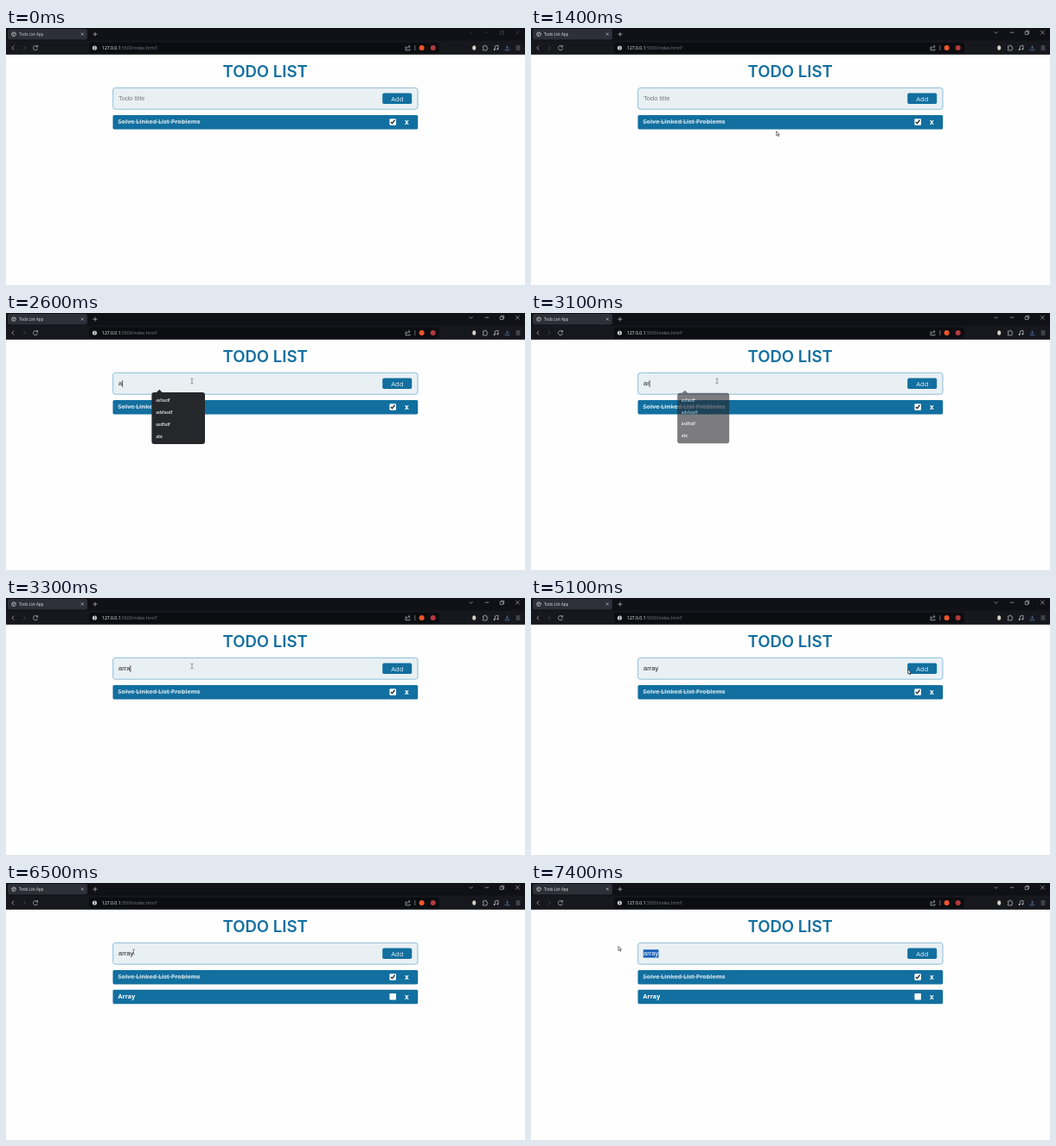
An HTML page for the animation above (8000 ms loop, 600 px wide and 298 px high).

```html
<!DOCTYPE html>
<html lang="en">
<head>
<meta charset="utf-8">
<title>Todo List App</title>
<style>
  html, body { margin: 0; width: 100%; height: 100%; overflow: hidden; background: #fefefe; }
  svg { display: block; width: 600px; height: 298px; }
  text { font-family: "Open Sans", "Noto Sans", sans-serif; white-space: pre; }
  .title { font: 600 18.6px Inter, sans-serif; fill: #126f9f; }
  .field { font: 7.6px "Liberation Sans", Arial, sans-serif; }
  .row { font-size: 7.15px; font-weight: 700; fill: #fff; }
  .done { fill: #bcd6e4; }
  .remove { font-size: 8px; }
  .line { fill: none; stroke: #c4c5cb; stroke-width: .7; }
  .dim { stroke: #8d9097; }
  .faint { stroke: #555860; }
  .menu text { font-size: 4.7px; font-weight: 600; fill: #ededef; }
</style>
</head>
<body>
<svg viewBox="0 0 600 298">
  <defs>
    <g id="bar">
      <rect x="123.5" width="352.7" height="16.4" rx="1.6" fill="#126f9f"/>
      <rect x="443.4" y="4.2" width="7.6" height="7.6" rx="1" fill="#fff"/>
      <text class="row remove" x="463.2" y="10.9" text-anchor="middle">x</text>
    </g>
  </defs>
  <rect width="600" height="298" fill="#fefefe"/>

  <g id="browser">
    <rect width="600" height="30.6" fill="#0f1116"/>
    <rect y="14.5" width="600" height="16.1" fill="#16181e"/>
    <rect x="2" y="1" width="92" height="12.6" rx="2.5" fill="#2d2f39"/>
    <rect x="96" y="16.8" width="405" height="12.4" rx="2.5" fill="#0c0d11"/>
    <g class="line">
      <circle cx="9" cy="7.2" r="2.4"/>
      <path d="M7 6.3l2 .8-.7 2M9.3 5l.5 1.2 1.4.6"/>
      <path d="M86.8 5.6l3 3m0-3l-3 3M100.5 7.2h5M103 4.7v5"/>
      <path d="M9.2 20.6L6.8 23l2.4 2.4"/>
      <path class="faint" d="M20 20.6l2.4 2.4-2.4 2.4"/>
      <path d="M36.2 21.6A2.6 2.6 0 1 0 36.6 23.8M36.6 20v2h-2"/>
      <path d="M463 21.8h-1v4h5v-1.5M463.6 24c.2-1.8 1.2-2.5 3.2-2.5m-1.3-1.5l1.6 1.5-1.6 1.5"/>
      <path class="dim" d="M472.8 20v6"/>
      <path d="M551.4 21h1.5a.9.9 0 0 1 1.8 0h1.2v1.6a.9.9 0 0 1 0 1.8v1.5h-4.5v-1.6a.9.9 0 0 0 0-1.8z"/>
      <path d="M565.3 25v-4l3.7-.8v4.2"/>
      <path d="M579.5 20.3v3.4m-1.6-1.4l1.6 1.6 1.6-1.6M577.1 24.5v1.2h4.8v-1.2" stroke="#5f82b8"/>
      <path class="dim" d="M589.6 21h4.8m-4.8 2h4.8m-4.8 2h4.8"/>
    </g>
    <circle cx="102.5" cy="23" r="2.6" fill="#c4c5cb"/>
    <path d="M102.5 22.6v1.8M102.5 21.3v.7" stroke="#0c0d11" stroke-width=".7"/>
    <circle cx="564.6" cy="25" r=".9" fill="#c4c5cb"/>
    <circle cx="568.3" cy="24.4" r=".9" fill="#c4c5cb"/>
    <circle cx="480.6" cy="23" r="3" fill="#f0562b"/>
    <circle cx="493.7" cy="23" r="3" fill="#b33a3c"/>
    <ellipse cx="541.2" cy="23" rx="2" ry="2.8" fill="#d9cfc3"/>
    <text id="tab" x="15" y="8.8" font-size="4.5" font-weight="500" fill="#e4e5e9">Todo List App</text>
    <text x="111" y="24.9" font-size="5.1" font-weight="500" fill="#f6f6f8">127.0.0.1<tspan font-weight="400" fill="#7c7e85">:5500/index.html?</tspan></text>
    <g id="controls" class="line">
      <path d="M535.6 4.3l2 2 2-2M553.6 5.2h4.6"/>
      <path d="M571.2 4.2h3.4v3.4h-3.4zM572.3 4.2v-1h3.4v3.4h-1"/>
      <path d="M589.2 3l4.4 4.4m0-4.4l-4.4 4.4"/>
    </g>
  </g>

  <text class="title" x="299.6" y="56.5" text-anchor="middle">TODO LIST</text>
  <rect x="123.7" y="69.4" width="352.3" height="24.8" rx="2.6" fill="#e9f0f4" stroke="#74b1d0" stroke-width=".8"/>
  <rect id="selection" y="77.2" height="9.4" fill="#1b62b8"/>
  <text id="input" class="field" x="130" y="84.4"><tspan></tspan><tspan fill="#fff"></tspan></text>
  <path id="caret" d="M0 78v8" stroke="#222" stroke-width=".7"/>
  <rect x="435.2" y="75.6" width="34" height="12.4" rx="1.8" fill="#126f9f"/>
  <text x="452.4" y="84.5" text-anchor="middle" font-size="7.7" font-weight="500" fill="#e6f1f6">Add</text>

  <use href="#bar" y="101"/>
  <text class="row done" x="129.6" y="111.4">Solve Linked List Problems</text>
  <path d="M129.4 108.9h95" stroke="#bcd6e4" stroke-width=".8"/>
  <path d="M444.9 109l1.6 1.6 3-3.9" fill="none" stroke="#15191c" stroke-width="1.3"/>
  <g id="added">
    <use href="#bar" y="123.8"/>
    <text class="row" x="129.6" y="134.3">Array</text>
  </g>

  <g id="menu" class="menu">
    <path d="M173.5 92.6l3.8-3.8 3.8 3.8z" fill="#26272b"/>
    <rect id="panel" x="168.4" y="92" width="61.6" rx="3" fill="#26272b"/>
    <g id="options"></g>
  </g>

  <g id="pointer">
    <path id="beam" d="M-1.5 -2.8h1.1l.4.4.4-.4h1.1M0 -2.4v4.8M-1.5 2.8h1.1l.4-.4.4.4h1.1" fill="none" stroke="#555" stroke-width=".6"/>
    <path id="arrow" d="M0 0v5l1.2-1 .9 2 .8-.4-.9-1.9h1.6z" fill="#fff" stroke="#222" stroke-width=".6"/>
  </g>
</svg>
<script>
const LOOP = 8000, STEP = 100;
const $ = id => document.getElementById(id);
const show = (el, on) => el.setAttribute("visibility", on ? "visible" : "hidden");
const set = (el, attrs) => { for (const k in attrs) el.setAttribute(k, attrs[k]); };

const allOptions = ["dfswvdfag", "asfasdf", "adsfasdf", "toluven", "sdfgsdfg", "dsfsdf"];
const matches = ["asfasdf", "adsfasdf", "asdfsdf", "abc"];
const typing = [[2500, "a"], [3000, "ar"], [3200, "arr"], [3300, "arra"], [3400, "array"]];
// time, x, y
const path = [[1300, 318, 140], [1600, 215, 79], [4400, 215, 79], [5100, 435.8, 83],
  [5300, 435.8, 83], [5600, 353, 85.5], [6200, 163, 82], [6400, 163, 82], [6800, 101, 73.3]];
const selectFrom = 6500;

function pointerAt(t) {
  const i = path.findIndex(p => p[0] > t);
  if (i < 0) return path[path.length - 1].slice(1);
  const [t0, x0, y0] = path[i - 1], [t1, x1, y1] = path[i];
  const k = (t - t0) / (t1 - t0);
  return [x0 + (x1 - x0) * k, y0 + (y1 - y0) * k];
}

function drawPointer(t) {
  const active = t >= path[0][0];
  const [x, y] = active ? pointerAt(t) : [0, 0];
  const overText = x > 123 && x < 435 && y > 69 && y < 95;
  set($("pointer"), { transform: `translate(${x} ${y})` });
  show($("beam"), active && overText);
  show($("arrow"), active && !overText);
}

function drawInput(t) {
  const typed = typing.filter(([at]) => at <= t).pop();
  const input = $("input"), [plain, marked] = input.children;
  const value = typed ? typed[1] : "Todo title";
  input.setAttribute("fill", typed ? "#222" : "#757b80");
  plain.textContent = value;
  marked.textContent = "";
  const width = n => n ? input.getSubStringLength(0, n) : 0;
  const full = width(value.length);

  let start = value.length;
  if (t >= selectFrom) {
    const x = pointerAt(t)[0] - 130;
    while (start && (width(start - 1) + width(start)) / 2 > x) start--;
  }
  const left = width(start);
  set($("selection"), { x: 129.8 + left, width: start < value.length ? full - left + .4 : 0 });
  plain.textContent = value.slice(0, start);
  marked.textContent = value.slice(start);

  const blinkOn = typed && (t < 3500 || Math.floor((t - 3500) / 500) % 2 === 0);
  show($("caret"), blinkOn && t < 5200);
  $("caret").setAttribute("transform", `translate(${130.4 + full} 0)`);
}

function drawMenu(t) {
  const alpha = t < 1700 ? 0 : t < 1800 ? .5 : t < 3100 ? 1 : t < 3200 ? .6 : 0;
  const list = t < 2600 ? allOptions : matches;
  const height = list.length * 14.1 + 3.6;
  const scale = alpha === 1 ? 1 : .975, cy = 92 + height / 2;
  set($("menu"), {
    opacity: alpha,
    transform: `translate(199.2 ${cy}) scale(${scale}) translate(-199.2 ${-cy})`
  });
  $("panel").setAttribute("height", height);
  $("options").innerHTML = list
    .map((s, i) => `<text x="173.2" y="${102.5 + i * 14.1}">${s}</text>`).join("");
}

function draw(time) {
  const t = Math.floor(time % LOOP / STEP) * STEP;
  const focused = t >= 1300;
  $("controls").setAttribute("opacity", focused ? .9 : .25);
  $("tab").setAttribute("opacity", focused ? 1 : .9);
  show($("added"), t >= 5200);
  drawInput(t);
  drawMenu(t);
  drawPointer(t);
}

const began = performance.now();
function tick() {
  draw(performance.now() - began);
  requestAnimationFrame(tick);
}
tick();
</script>
</body>
</html>
```
